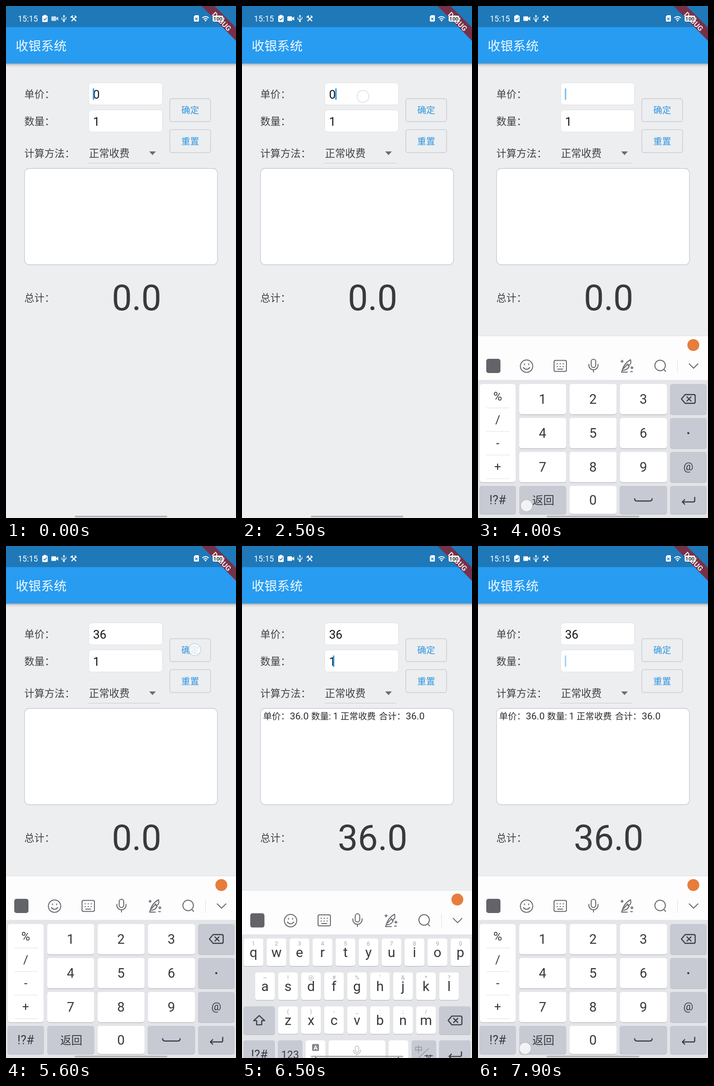
These frames come from a looping animation (502x1116 px, 8 s). An HTML page:

```html
<!DOCTYPE html>
<html lang="zh">
<head>
<meta charset="utf-8">
<style>
html, body { margin: 0; width: 100%; height: 100%; overflow: hidden; background: #edeef0; }
svg { display: block; width: 100vw; height: 100vh; font-family: Roboto, "Noto Sans CJK SC", "Noto Sans CJK", sans-serif; }
.line { fill: none; stroke: #66676c; stroke-width: 2; stroke-linecap: round; stroke-linejoin: round; }
.dark { stroke: #3c3d42; stroke-width: 2.4; }
</style>
</head>
<body>
<svg id="stage" viewBox="0 0 502 1116" preserveAspectRatio="none"></svg>
<script>
const INK = '#414246', KEY = '#fff', GREY = '#c7cad3';

const text = (s, x, y, size, fill = INK, more = '') =>
  `<text x="${x}" y="${y}" font-size="${size}" fill="${fill}" ${more}>${s}</text>`;
const mid = (s, x, y, size, fill, more = '') => text(s, x, y, size, fill, 'text-anchor="middle" ' + more);
const box = (x, y, w, h, r, fill, more = '') =>
  `<rect x="${x}" y="${y}" width="${w}" height="${h}" rx="${r}" fill="${fill}" ${more}/>`;
const line = (d, cls = '') => `<path class="line ${cls}" d="${d}"/>`;
const shape = (d, fill = '#fff') => `<path d="${d}" fill="${fill}"/>`;
const key = (x1, x2, y, h, fill = KEY) =>
  box(x1, y + 1.5, x2 - x1, h, 5, '#bfc0c6') + box(x1, y, x2 - x1, h, 5, fill);

const backspace = (x, y) => line(`M${x - 15} ${y}l8 -9.500h19q3 0 3 3v13q0 3 -3 3h-19z
  M${x - 3} ${y - 4.5}l9 9m0 -9l-9 9`, 'dark');
const enter = (x, y) => line(`M${x + 14} ${y - 6}v7q0 3 -3 3h-24m5 -5l-5 5l5 5`, 'dark');
const spaceMark = (x, y, w) => line(`M${x - w} ${y - 3}q0 5 5 5h${2 * w - 10}q5 0 5 -5`, 'dark');
const mic = (x, y, k, color) => `<g transform="translate(${x} ${y}) scale(${k})">
  <path class="line" style="stroke:${color}" d="M-5 -9a5 5 0 0 1 10 0v8a5 5 0 0 1 -10 0zM-10 -3v2a10 10 0 0 0 20 0v-2M0 9v5"/></g>`;

function statusBar() {
  return text('15:15', 26, 34, 17.5, '#fff')
    + box(79, 21, 12, 14, 2, '#fff') + box(82, 19.500, 6, 3, 1, '#fff')
    + '<path d="M82 28l2.500 2.500l4.500 -5" fill="none" stroke="#1f78b8" stroke-width="1.700"/>'
    + `<g id="cam">${box(99, 22.5, 10.5, 10, 1.5, '#fff')}${shape('M109 27l5 -4v9l-5 -4z')}</g>`
    + '<path d="M126.500 22v11M122 25v3q0 2 4.500 3M131 24v3q0 2 -4.500 3" fill="none" stroke="#fff" stroke-width="1.400"/>'
    + shape('M124 23l2.500 -4l2.500 4z') + '<circle cx="126.500" cy="33" r="2" fill="#fff"/>'
    + '<path d="M143 23l10 10M153 23l-10 10M141 25l5 -4M150 21l4 4" stroke="#fff" stroke-width="2.400"/>'
    + shape('M413 20h6q2 0 2 2v10q0 2 -2 2h-7q-2 0 -2 -2v-9z')
    + '<path d="M413 25.500l5 5m0 -5l-5 5" stroke="#1f78b8" stroke-width="1.500"/>'
    + '<path d="M428.500 26q7 -6 14 0M431.500 29q4 -3.500 8 0" fill="none" stroke="#fff" stroke-width="2"/>'
    + shape('M433 31q2.500 -2 5 0l-2.500 3z');
}

function app() {
  const debug = shape('M427 0H455L502 47V76Z', '#763149')
    + mid('DEBUG', 0, 5.5, 16, '#efe6ea', 'font-weight="700" transform="translate(470.500 34) rotate(45)"');
  const battery = box(451, 21, 23, 13, 3, '#fff') + box(474.5, 25, 2, 5, 1, '#fff')
    + mid('100', 462.5, 31.8, 11.5, '#29292c', 'font-weight="700"');
  const field = y => box(180.5, y, 161, 48, 7, '#fff', 'stroke="#dfe0e5"');
  const button = (s, y) => box(357.5, y, 89, 50, 4.5, 'none', 'stroke="#c9cbd1" stroke-width="1.400"')
    + mid(s, 402, y + 32, 19.5, '#3096e0');
  return box(0, 0, 502, 1116, 0, '#edeef0')
    + box(0, 125, 502, 9, 0, 'url(#shade)')
    + box(0, 46, 502, 79, 0, '#279cf1') + box(0, 0, 502, 46, 0, '#1f78b8')
    + statusBar() + text('收银系统', 21, 97, 27.8, '#f2f9fe') + debug + battery
    + text('单价：', 40, 200, 22) + text('数量：', 40, 259, 22)
    + text('计算方法：', 40, 328.500, 22) + text('总计：', 40, 643.500, 22)
    + field(167.5) + field(226.5)
    + text('正常收费', 181, 328.500, 22.2) + shape('M312.500 317h14.500l-7.200 8z', '#6b6c6e')
    + box(180, 342, 157, 1, 0, '#c8c9cc')
    + button('确定', 202) + button('重置', 269.5)
    + box(40.5, 354, 421, 210, 10, '#fff', 'stroke="#c8c8da" stroke-width="1.300"')
    + text('', 190, 201.500, 26, '#161617', 'id="price"') + text('', 190, 260.500, 26, '#161617', 'id="count"')
    + '<g id="receipt">' + [['单价：', 46], ['36.0', 104.500], ['数量: 1', 151], ['正常收费', 215], ['合计：', 299], ['36.0', 357.500]]
      .map(([s, x]) => text(s, x, 378, /^\d/.test(s) ? 21 : 19.3, '#2d2d30')).join('') + '</g>'
    + mid('', 285, 662.5, 78, '#39393d', 'id="total"')
    + box(0, 0, 3, 25, 1, '#2d97e6', 'id="caret"');
}

function toolbar() {
  return box(0, 719, 502, 397, 0, '#e4e5e9') + box(0, 719, 502, 96, 0, '#fdfdfe')
    + box(0, 718.5, 502, 1, 0, '#dfe0e3')
    + '<circle cx="470" cy="739" r="13" fill="#e67d3c"/>'
    + box(18, 769, 31, 31, 5, '#636469')
    + line(`M92.500 785a13.500 13.500 0 1 0 27 0a13.500 13.500 0 1 0 -27 0
      M101.500 780v2M110.500 780v2M99 788q7 8 14 0`)
    + line('M169 772.500h21q3 0 3 3v18q0 3 -3 3h-21q-3 0 -3 -3v-18q0 -3 3 -3zM174 791.500h11')
    + line('M172.500 780h1m5.500 0h1m5.500 0h1M172.500 786h1m5.500 0h1m5.500 0h1')
    + mic(252, 784, 1, '#66676c')
    + line('M313 798h13M314 797q4 -18 19 -26q2 8 -2 11l-4 1l3 2q-4 9 -14 9M318 790l9 -10')
    + line('M314.500 772v5m-2.500 -2.500h5M336 786v5m-2.500 -2.500h5M333 797h4')
    + line('M386 783.500a11.500 11.500 0 1 0 23 0a11.500 11.500 0 1 0 -23 0M405.500 792l4 4.500')
    + box(435, 770, 1, 30, 0, '#dedfe2') + line('M461 780l9.500 9.500l9.500 -9.500');
}

function letterKeys() {
  const rows = [
    ['qwertyuiop', '1234567890', 25, 824],
    ['asdfghjkl', "~!@#%'&*?", 50.2, 898],
    ['zxcvbnm', '()-_:;/', 100.4, 972]
  ];
  const letters = rows.map(([chars, hints, x0, y]) => [...chars].map((c, i) => {
    const x = x0 + i * 50.2;
    return key(x - 21.5, x + 21.5, y, 60) + mid(hints[i].replace('&', '&amp;'), x, y + 15.5, 13, '#a9aab0')
      + mid(c, x, y + 40.5, 30, '#37383c');
  }).join('')).join('');
  return letters
    + key(3, 72, 972, 61, GREY) + line('M37.500 992l12 11h-6.500v9h-11v-9h-6.500z', 'dark')
    + key(430, 499, 972, 61, GREY) + backspace(465, 1002.5)
    + key(3, 72, 1046, 61, GREY) + mid('!?#', 38, 1086, 27, '#3c3d42')
    + key(78, 132, 1046, 61, GREY) + mid('123', 105, 1085.5, 23, '#3c3d42')
    + key(139, 182, 1046, 61) + box(153, 1054, 15, 15, 2, '#85868b')
    + mid('A', 160.5, 1066.5, 13.5, '#fff', 'font-weight="700"') + mid(',', 160.5, 1085, 28, '#37383c')
    + key(189, 313, 1046, 61) + mic(251, 1069, 0.75, '#b8b9be') + spaceMark(251, 1090, 21)
    + key(320, 363, 1046, 61) + mid('.', 341.5, 1085.5, 28, '#37383c')
    + key(370, 424, 1046, 61, GREY) + mid('中', 385.500, 1072, 18, '#8d8f96')
    + '<path d="M382 1087l26 -24" stroke="#8d8f96" stroke-width="1.300"/>' + mid('英', 407.500, 1095, 21.5, '#37383c')
    + key(430, 499, 1046, 61, GREY) + enter(465, 1077);
}

function numberKeys() {
  let s = key(4, 82, 824, 214);
  [...'%/-+'].forEach((c, i) => {
    s += mid(c, 43, 859.500 + i * 51.3, 26, '#37383c') + box(18, 875.5 + i * 51.4, 51, 1, 0, '#dfe0e4');
  });
  for (let n = 0; n < 9; n++) {
    const x = 90 + n % 3 * 110, y = 824 + Math.floor(n / 3) * 74;
    s += key(x, x + 102.5, y, 66) + mid(n + 1, x + 51, y + 43, 29, '#37383c');
  }
  for (const y of [824, 898, 972]) s += key(419, 499, y, 66, GREY);
  return s + backspace(459, 856.5) + '<circle cx="459" cy="931" r="2.300" fill="#37383c"/>'
    + mid('@', 459, 1012, 24, '#37383c')
    + key(3, 83, 1046, 61, GREY) + mid('!?#', 43, 1086, 27, '#3c3d42')
    + key(90, 192.5, 1046, 61, GREY) + mid('返回', 142.500, 1086, 24, '#37383c')
    + key(200, 302.5, 1046, 61) + mid('0', 251, 1087, 29, '#37383c')
    + key(309, 412.5, 1046, 61, GREY) + spaceMark(361, 1077, 19)
    + key(419, 499, 1046, 61, GREY) + enter(459, 1077);
}

const $ = id => document.getElementById(id);
$('stage').innerHTML = `<defs><linearGradient id="shade" x2="0" y2="1">
  <stop stop-opacity=".34"/><stop offset=".4" stop-opacity=".1"/><stop offset="1" stop-opacity="0"/></linearGradient></defs>`
  + app() + `<g id="board">${toolbar()}<g id="letters">${letterKeys()}</g><g id="numbers">${numberKeys()}</g></g>`
  + box(150, 1111, 202, 3.5, 1.7, '#b3b4b7')
  + '<circle id="touch" r="13" fill="#fff" fill-opacity=".78" stroke="#55565a" stroke-opacity=".16" stroke-width="2"/>';

const clamp = v => Math.max(0, Math.min(1, v));
const show = (id, on) => $(id).setAttribute('opacity', +on);
// Latest entry [start, ...values] that has begun
const at = (list, t) => list.filter(e => e[0] <= t).pop();

const PRICE = [[0, '0'], [3600, ''], [4700, '3'], [5050, '36']];
const COUNT = [[0, '1'], [7470, '']];
// [reset time, x, y]
const CARET = [[-200, 189.5, 179.5], [2450, 203.5, 179.5], [3600, 189.5, 179.5], [4700, 205, 179.5],
  [5050, 218.5, 179.5], [6200, 198.500, 238.5], [7470, 189.5, 238.5]];
// [press, release, x, y]
const TAPS = [[2420, 2570, 264, 197], [3500, 3620, 465, 1002], [3860, 4080, 106, 1089], [4610, 4740, 360, 857],
  [4960, 5090, 360, 931], [5530, 5690, 412, 226], [6120, 6240, 262, 251], [7380, 7500, 465, 1002], [7800, 8060, 103, 1095]];
const DONE = 5700;

const rise = (t, t0) => (1 - clamp((t - t0) / 440)) ** 3;
function boardOffset(t) {
  if (t < DONE) return rise(t, 2600);
  return t < 6200 ? clamp((t - DONE) / 250) ** 2 : rise(t, 6250);
}

function draw(t) {
  $('price').textContent = at(PRICE, t)[1];
  $('count').textContent = at(COUNT, t)[1];
  $('total').textContent = t < DONE ? '0.0' : '36.0';
  show('receipt', t >= DONE);
  show('cam', t < 400 ? 0.75 : 1);

  const [reset, x, y] = at(CARET, t), phase = (t - reset) % 1000;
  const glow = phase < 500 ? clamp((500 - phase) / 150) : clamp((phase - 850) / 150);
  $('caret').setAttribute('transform', `translate(${x} ${y})`);
  show('caret', t >= DONE && t < 6200 ? 0 : glow);

  $('board').setAttribute('transform', `translate(0 ${boardOffset(t) * 399})`);
  const digits = t >= 3950 && t < 6000 || t >= 7850;
  show('numbers', digits);
  show('letters', !digits);

  const tap = at(TAPS, t);
  if (tap) $('touch').setAttribute('transform', `translate(${tap[2]} ${tap[3]})`);
  show('touch', tap ? clamp((tap[1] - t) / 60) : 0);
}

const start = performance.now();
function tick(now) {
  draw(Math.max(0, now - start) % 8000);
  requestAnimationFrame(tick);
}
draw(0);
requestAnimationFrame(tick);
</script>
</body>
</html>
```
